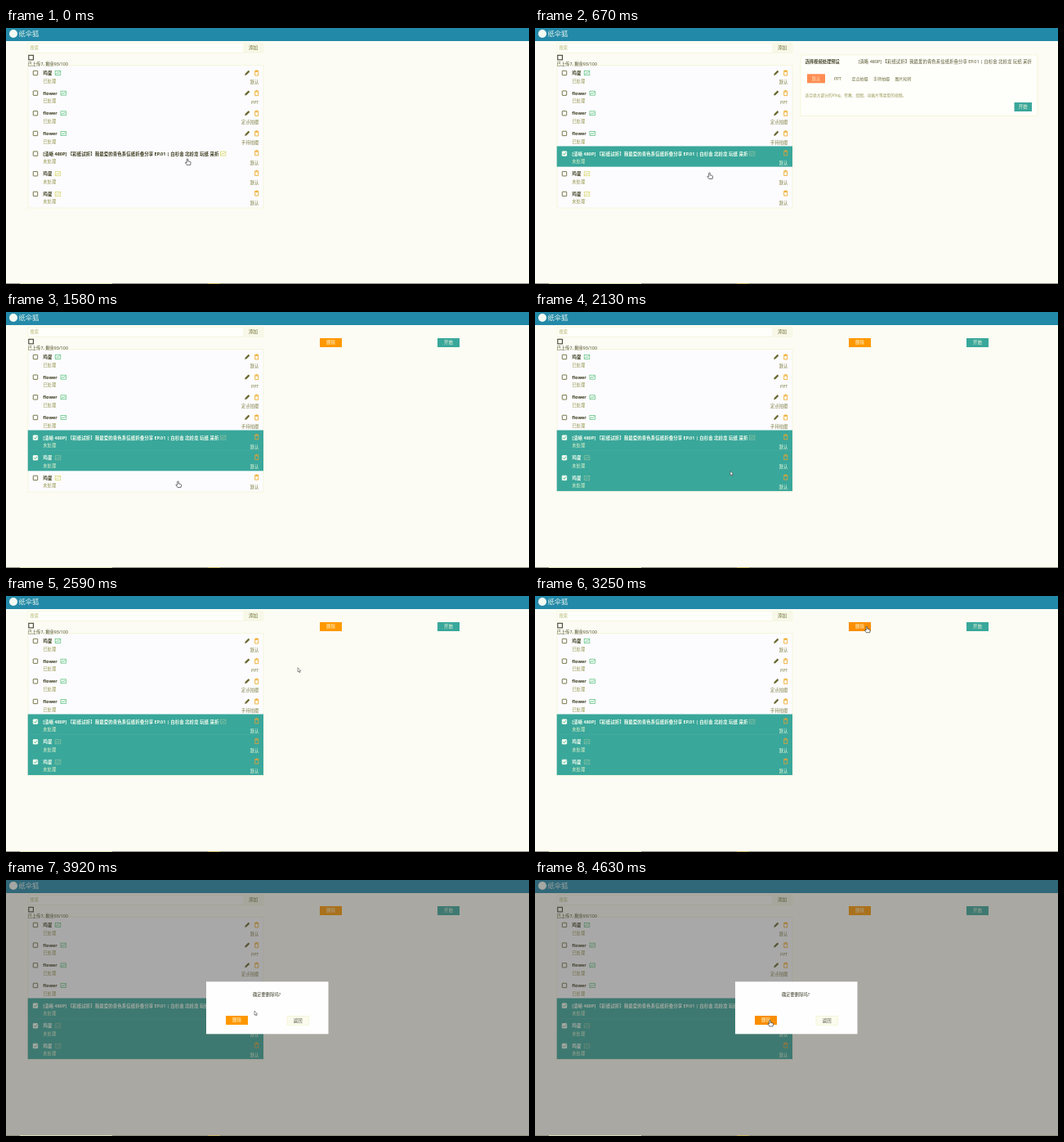
An HTML page that plays this animation: 640x313 px, repeating every 4920 ms.

```html
<!DOCTYPE html>
<html>
<head>
<meta charset="utf-8">
<style>
html, body { margin: 0; width: 100%; height: 100%; overflow: hidden; background: #fcfcf4; }
svg { display: block; width: 100%; height: 100%; }
text { font-family: "Noto Sans", "Noto Sans CJK SC", "Noto Sans CJK", sans-serif; white-space: pre; }
</style>
</head>
<body>
<svg id="stage" viewBox="0 0 640 313" preserveAspectRatio="none"></svg>
<script>
const LOOP = 4920;
const NS = "http://www.w3.org/2000/svg";
const stage = document.getElementById("stage");
const TEAL = "#3aa79b", ORANGE = "#ff9800", HOVER = "#fa8e00", EDGE = "#f3f3d2";
const TITLE = "[清晰 480P] 【彩纸试折】我最爱的青色系信纸折叠分享 EP.01 | 白杉金 北岭龙 玩纸 采折";

function add(parent, tag, attrs) {
  const el = document.createElementNS(NS, tag);
  for (const k in attrs) el.setAttribute(k, attrs[k]);
  parent.appendChild(el);
  return el;
}
const group = (parent, x = 0, y = 0) => add(parent, "g", { transform: `translate(${x} ${y})` });
const rect = (parent, x, y, width, height, fill, more) =>
  add(parent, "rect", { x, y, width, height, fill, ...more });
const path = (parent, d, stroke, width = 0.8, fill = "none") =>
  add(parent, "path", { d, stroke, fill, "stroke-width": width, "stroke-linejoin": "round" });

// y is the vertical middle of the line
function label(parent, str, x, y, size, fill, more) {
  const el = add(parent, "text", { x, y: y + size * 0.37, "font-size": size, fill, ...more });
  el.textContent = str;
  return el;
}
const BOLD = { "font-weight": 700 };
const END = { "text-anchor": "end" };
const MID = { "text-anchor": "middle" };

function button(parent, str, x, y, w, fill, ink = "#fffbe0", more) {
  const box = rect(parent, x, y, w, 11, fill, more);
  label(parent, str, x + w / 2, y + 5.5, 5.4, ink, { ...MID, "font-weight": 500 });
  return box;
}
const show = (el, on) => el.setAttribute("display", on ? "inline" : "none");

// page
rect(stage, 0, 0, 640, 313, "#fcfcf4");
rect(stage, 0, 0, 640, 16, "#2389a8");
add(stage, "circle", { cx: 9, cy: 7, r: 5, fill: "#f4faf4" });
label(stage, "纸伞狐", 15.5, 6.5, 8.3, "#e4f3ec");
rect(stage, 27, 18.5, 288, 12, "#fefefa", { stroke: EDGE, "stroke-width": 0.6 });
rect(stage, 290, 18.5, 25, 12, "#f8f8e8");
label(stage, "搜索", 29.5, 24.3, 5.2, "#b5b56c");
label(stage, "添加", 297, 24.3, 5.6, "#6d6d35");
rect(stage, 27.8, 33.3, 5.6, 5.6, "none", { stroke: "#333322", "stroke-width": 1 });

// file list
const ROW = 24.65, TOP = 47.4;
rect(stage, 27, 45.5, 288, 174.5, "#fcfcfe", { stroke: EDGE, "stroke-width": 0.7 });
label(stage, "已上传7, 剩余93/100", 26.5, 43.8, 5.3, "#4d4d28");

function trash(parent, x, y, color) {
  path(parent, `M${x - 2.6} ${y - 2.5}h5.2M${x - 1} ${y - 3.2}h2M${x - 2} ${y - 1.6}h4v4.6h-4z`, color, 0.9);
}
function picture(parent, x, y, color) {
  rect(parent, x, y - 2.5, 6.6, 5, "none", { stroke: color, "stroke-width": 0.7 });
  path(parent, `M${x + 1} ${y + 1.4}l1.5 -1.8l1.2 1.1l1.7 -2`, color, 0.8);
}
function face(parent, [name, kind, done], on) {
  const g = group(parent);
  const y = 7.6;
  if (on) rect(g, -0.3, -1.5, 288.3, ROW + 0.5, TEAL);
  rect(g, 6.3, y - 2.7, 5.4, 5.4, on ? "#f8fff0" : "none",
    { stroke: on ? "#f8fff0" : "#6a6a38", "stroke-width": 0.9, rx: 0.4 });
  if (on) path(g, `M7.2 ${y}l1.4 1.5l2.4 -3`, TEAL, 0.9);
  label(g, name, 18.3, y, 5.5, on ? "#f6fff0" : "#3a3a1c", BOLD);
  const long = name === TITLE;
  const iconX = long ? 235.3 : name === "flower" ? 40 : 33.2;
  picture(g, iconX, y, on ? "#8fc4a0" : done ? "#4cbc72" : "#d5d45a");
  label(g, done ? "已处理" : "未处理", 18.3, y + 9.6, 5.3, on ? "#e4f4cb" : "#94944c");
  if (done) {
    path(g, `M265.6 ${y + 2.5}l.5 -1.8l3.6 -3.6l1.3 1.3l-3.6 3.6z`, "#65652c", 0.6, "#65652c");
  }
  trash(g, 279.7, y - (done ? 0 : 0.8), on ? "#d9a43c" : "#efad2c");
  label(g, kind, 282.3, y + 11.2, 5.3, on ? "#eefbdc" : "#7d7d40", END);
  return g;
}
const rows = [
  ["鸡蛋", "默认", true], ["flower", "PPT", true],
  ["flower", "定点拍摄", true], ["flower", "手持拍摄", true],
  [TITLE, "默认", false, 240], ["鸡蛋", "默认", false, 850], ["鸡蛋", "默认", false, 1800]
].map((row, i) => {
  const g = group(stage, 27, TOP + i * ROW);
  const off = face(g, row, false);
  const on = row[3] ? face(g, row, true) : null;
  return { off, on, at: row[3] };
});

// preset panel for a single file
const panel = group(stage);
rect(panel, 325, 33, 290, 74.5, "#fefefa", { stroke: EDGE, "stroke-width": 0.7 });
label(panel, "选择视频处理预设", 330.5, 41.3, 5.3, "#45452a", BOLD);
label(panel, TITLE, 608, 41.3, 5.45, "#55552f", { ...END, "font-weight": 500 });
rect(panel, 333, 56.3, 22, 11, "#ff8c52");
label(panel, "默认", 344, 61.8, 5.2, "#ffe9c0", MID);
[["PPT", 366], ["定点拍摄", 387.5], ["手持拍摄", 414], ["图片轮转", 440.5]]
  .forEach(([s, x]) => label(panel, s, x, 61.8, 5, "#6b6b3a"));
label(panel, "适合绝大部分的Vlog、传教、绘图、动画片等类型的视频。", 330.5, 82.5, 4.75, "#9a9a58");
button(panel, "开始", 586.5, 91, 21.5, TEAL);

// buttons for several files
const batch = group(stage);
const removeBox = button(batch, "删除", 384, 32, 27, ORANGE);
button(batch, "开始", 528, 32, 27, TEAL);

// confirmation
const modal = group(stage);
rect(modal, 0, 0, 640, 313, "rgb(68,64,62)", { "fill-opacity": 0.45 });
rect(modal, 245, 124.3, 149.5, 64, "#fefefe");
label(modal, "确定要删除吗?", 319, 139.6, 5.3, "#3d3d2a", MID);
const confirmBox = button(modal, "删除", 269, 166, 27, ORANGE);
button(modal, "返回", 344, 166.3, 26.5, "#fbfbee", "#4c4c3a", { stroke: "#f2f2cc", "stroke-width": 0.6 });

// strip at the bottom edge, never dimmed
rect(stage, 0, 312, 640, 1, "#8f9080");
rect(stage, 17, 312, 113, 1, "#dcdcb8");
rect(stage, 247, 312, 15, 1, "#c3b163");

// pointer, tip at 0,0
const pointer = group(stage);
const hand = path(pointer,
  "M-.8 .4Q0 -.6 .8 .4V3L3.2 3.4Q4.2 3.7 4.1 4.7L3.6 7.4H-.6L-2.6 4.6Q-2.5 3.6 -.8 4.6Z",
  "#333", 0.7, "#fff");
const arrow = path(pointer, "M0 0V5.2L1.2 4.2L2 6L2.9 5.6L2.1 3.9H3.7Z", "#333", 0.5, "#fff");

const track = [
  [0, 222, 160], [240, 221, 159], [420, 219, 163], [670, 213.5, 177], [850, 212, 179],
  [1150, 211, 182], [1580, 210.5, 207], [1800, 211, 207], [2130, 239, 194.5],
  [2250, 242, 192], [2500, 330, 110], [2750, 410, 44], [2950, 406.5, 37.5],
  [3250, 406, 37.3], [3460, 407, 37.6], [3700, 360, 100], [3920, 304, 160],
  [4200, 293, 169], [4460, 287.5, 171.5], [LOOP, 287.5, 171.5]
];
function place(t) {
  let i = 1;
  while (track[i][0] < t) i++;
  const [t0, x0, y0] = track[i - 1], [t1, x1, y1] = track[i];
  const u = (t - t0) / (t1 - t0);
  const k = u * u * (3 - 2 * u) * 0.4 + u * 0.6;
  return [x0 + (x1 - x0) * k, y0 + (y1 - y0) * k];
}
const inside = (x, y, bx, by) => x >= bx && x <= bx + 27 && y >= by && y <= by + 11;

function draw(t) {
  const [x, y] = place(t);
  let count = 0;
  for (const r of rows) {
    if (!r.on) continue;
    const on = t >= r.at;
    if (on) count++;
    show(r.on, on);
    show(r.off, !on);
  }
  const open = t >= 3290;
  show(panel, count === 1);
  show(batch, count > 1);
  show(modal, open);
  const overRemove = !open && count > 1 && inside(x, y, 384, 32);
  const overConfirm = open && inside(x, y, 269, 166);
  removeBox.setAttribute("fill", overRemove ? HOVER : ORANGE);
  confirmBox.setAttribute("fill", overConfirm ? HOVER : ORANGE);
  const pointing = t < 2050 || overRemove || overConfirm;
  show(hand, pointing);
  show(arrow, !pointing);
  pointer.setAttribute("transform", `translate(${x.toFixed(2)} ${y.toFixed(2)})`);
}

const start = performance.now();
function tick() {
  draw((performance.now() - start) % LOOP);
  requestAnimationFrame(tick);
}
tick();
</script>
</body>
</html>
```
